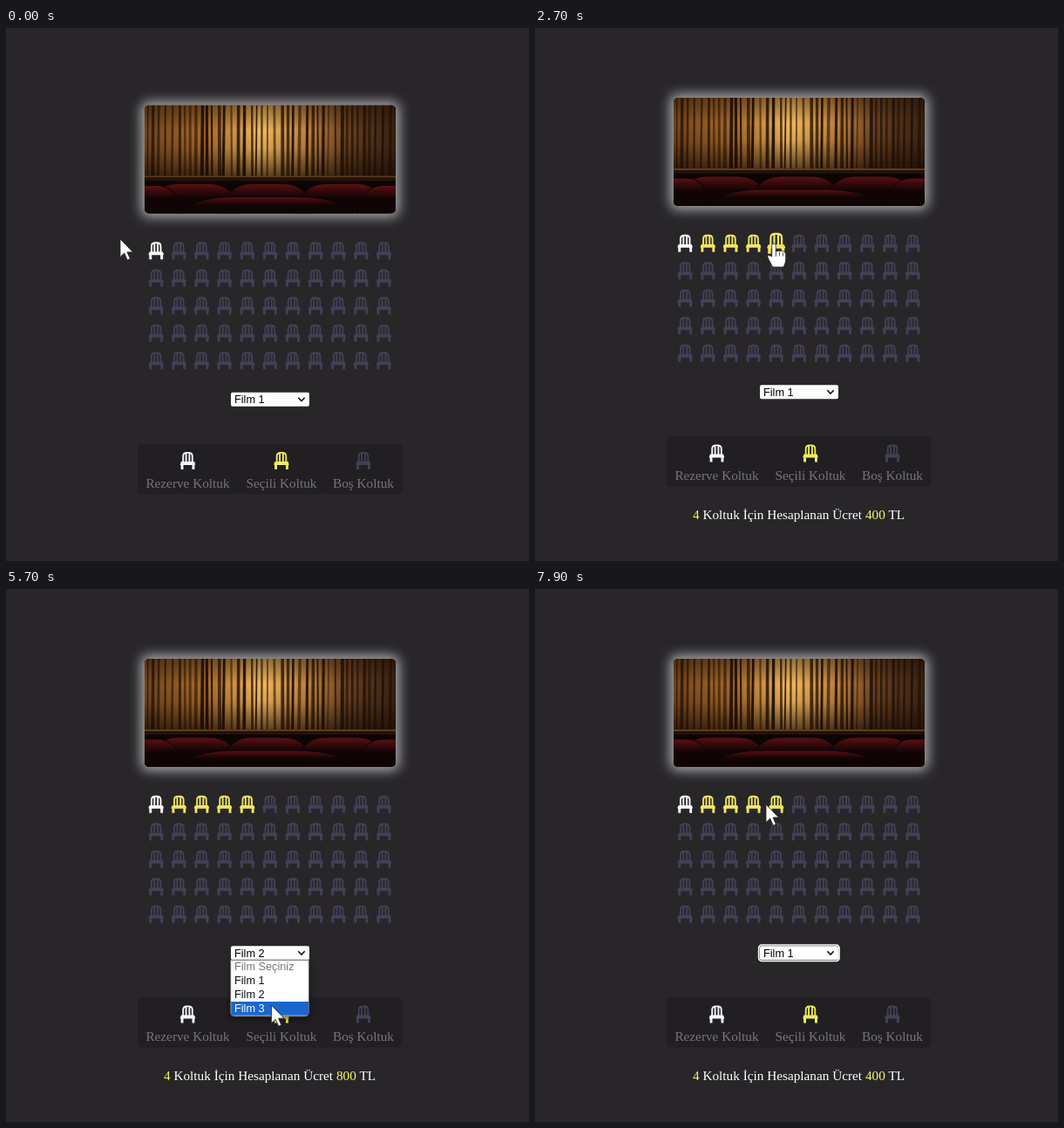
Recreate the animation shown at these times as an HTML page. Size 600x611 px, loop 8000 ms.

```html
<!DOCTYPE html>
<html lang="tr">
<head>
<meta charset="utf-8">
<style>
html, body { margin: 0; width: 100%; height: 100%; overflow: hidden; background: #282629; }
svg { display: block; width: 100vw; height: 100vh; }
.serif { font: 15.27px "Liberation Serif", "Times New Roman", serif; text-anchor: middle; }
.sans { font: 12.73px "Liberation Sans", Arial, sans-serif; }
</style>
</head>
<body>
<svg viewBox="0 0 600 611">
  <defs>
    <g id="chair">
      <path d="M-5.300 2V-5Q-5.300-9-1-9H1Q5.300-9 5.300-5V2M-1.900-9V2M1.900-9V2" fill="none" stroke="currentColor" stroke-width="1.870"/>
      <path d="M-7.500 1.200H7.500L8.700 4Q8.700 5 7.900 5V10H5V5H-5V10H-7.900V5Q-8.700 5-8.700 4z" fill="currentColor"/>
    </g>
    <linearGradient id="cloth">
      <stop offset="0" stop-color="#7a4a1c"/>
      <stop offset=".25" stop-color="#b0702e"/>
      <stop offset=".46" stop-color="#ffc465"/>
      <stop offset=".65" stop-color="#c88740"/>
      <stop offset=".82" stop-color="#6b4220"/>
      <stop offset="1" stop-color="#3a2314"/>
    </linearGradient>
    <linearGradient id="shade" x2="0" y2="1">
      <stop offset="0" stop-color="#170a03" stop-opacity=".45"/>
      <stop offset=".35" stop-color="#170a03" stop-opacity=".05"/>
      <stop offset=".6" stop-color="#170a03" stop-opacity=".15"/>
      <stop offset="1" stop-color="#170a03" stop-opacity=".7"/>
    </linearGradient>
    <linearGradient id="velvet" x2="0" y2="1">
      <stop offset="0" stop-color="#5c1214"/>
      <stop offset=".2" stop-color="#3a0a0c"/>
      <stop offset=".45" stop-color="#100405"/>
    </linearGradient>
    <clipPath id="frame"><rect width="288" height="124" rx="5"/></clipPath>
    <filter id="glow" x="-20%" y="-40%" width="140%" height="180%"><feGaussianBlur stdDeviation="7"/></filter>
    <filter id="soft" x="-20%" y="-20%" width="140%" height="150%"><feGaussianBlur stdDeviation="4"/></filter>
  </defs>

  <g id="page">
    <g transform="translate(159 80)">
      <rect x="-4" y="-4" width="296" height="132" rx="8" fill="#fff" opacity=".62" filter="url(#glow)"/>
      <g clip-path="url(#frame)">
        <rect width="288" height="124" fill="#0c0505"/>
        <rect width="288" height="82" fill="url(#cloth)"/>
        <g id="folds" fill="#1f0f05"/>
        <rect width="288" height="82" fill="url(#shade)"/>
        <rect y="81" width="288" height="2" fill="#5d3b1b"/>
        <rect y="83" width="288" height="4" fill="#22120a"/>
        <g id="stalls" fill="url(#velvet)" stroke="#080304"/>
      </g>
    </g>
    <g id="seats"></g>
    <rect x="151" y="468.300" width="303.500" height="57.500" rx="5" fill="#211f22"/>
    <g class="serif" fill="#777577">
      <text x="208.500" y="518">Rezerve Koltuk</text>
      <text x="316" y="518">Seçili Koltuk</text>
      <text x="410" y="518">Boş Koltuk</text>
    </g>
    <use href="#chair" x="208.500" y="487.400" color="#f7f7f9"/>
    <use href="#chair" x="316" y="487.400" color="#f1eb5b"/>
    <use href="#chair" x="410" y="487.400" color="#434056"/>
    <rect id="ring" x="256.700" y="408" width="92.300" height="18.500" rx="3.500" fill="#111" stroke="#fff" stroke-width="1.700"/>
    <rect x="258" y="409.300" width="90" height="16" rx="2" fill="#fff"/>
    <text class="sans" id="choice" x="262" y="421.700"></text>
    <path d="M335.300 415.300l3.700 3.700 3.700-3.700" fill="none" stroke="#111" stroke-width="1.600"/>
    <g id="menu" class="sans">
      <rect x="258" y="430" width="90" height="62" rx="5" opacity=".55" filter="url(#soft)"/>
      <path d="M257.700 425.300h89.800v59.500q0 5-5 5h-79.800q-5 0-5-5z" fill="#fff" stroke="#66656a" stroke-width=".9"/>
      <rect id="mark" x="258.200" width="88.800" height="15.800" fill="#1a66cf"/>
    </g>
  </g>
  <text class="serif" id="total" x="302.500" y="563" fill="#fff"><tspan id="count" fill="#f8f562"></tspan> Koltuk İçin Hesaplanan Ücret <tspan id="price" fill="#f8f562"></tspan> TL</text>
  <g id="cursor" fill="#fff" stroke="#222" stroke-width=".8">
    <path id="arrow" d="M0 0v20.500l4.800-4.500 3.400 8 3.200-1.400-3.400-7.700h6.500z"/>
    <g id="hand">
      <path d="M-2 2Q0-2 2.500 2V9Q13 7 14 12V18Q14 22 11.500 27H-1L-6 17.500Q-9 11-2 15z"/>
      <path d="M2.700 9v6M6.800 9.500v5M10.700 10.500v4" fill="none"/>
    </g>
  </g>
</svg>
<script>
const LOOP = 8000, FADE = 300, SAMPLES = 8, SAMPLE_MS = 25;
const $ = id => document.getElementById(id);
const show = (id, on) => $(id).style.display = on ? '' : 'none';
const clamp = (v, lo, hi) => Math.min(hi, Math.max(lo, v));
function add(parent, tag, attrs) {
  const el = document.createElementNS('http://www.w3.org/2000/svg', tag);
  for (const k in attrs) el.setAttribute(k, attrs[k]);
  return $(parent).appendChild(el);
}

// Curtain folds
let seed = 11;
const rnd = () => (seed = seed * 16807 % 2147483647) / 2147483647;
for (let x = 3; x < 288; x += 5 + rnd() * 4) {
  const w = 1.5 + rnd() * 2, lean = rnd() * 2 - 1;
  add('folds', 'path', {
    d: `M${x} 0h${w}L${x + w + lean} 82h${-w * 1.2}z`,
    opacity: .55 + rnd() * .4
  });
}

// Cinema chairs: back row, two at the sides, one in front
function stall(left, width, top) {
  const right = left + width, bend = width / 6;
  add('stalls', 'path', {
    d: `M${left} 126Q${left + bend / 2} ${top} ${left + bend * 2} ${top}H${right - bend * 2}Q${right - bend / 2} ${top} ${right} 126z`
  });
}
for (let i = 0; i < 3; i++) stall(i * 85, 112, 90);
stall(-45, 90, 92);
stall(243, 90, 92);
stall(36, 206, 105);

const EMPTY = [67, 64, 86], PICKED = [241, 231, 98];
const seats = Array.from({ length: 55 }, (_, i) => ({
  x: 172.2 + i % 11 * 26.13,
  y: 246.7 + Math.floor(i / 11) * 31.5,
  el: add('seats', 'use', { href: '#chair' })
}));

const rowY = i => 425.3 + i * 15.9;
const films = ['Film Seçiniz', 'Film 1', 'Film 2', 'Film 3'];
const rows = films.map((name, i) => {
  const el = add('menu', 'text', { x: 262, y: rowY(i) + 12 });
  el.textContent = name;
  return el;
});

const clicks = [600, 1000, 1340, 2100];
const menus = [
  { open: 3900, pick: 4450, film: 2 },
  { open: 5200, pick: 5750, film: 3 },
  { open: 6250, pick: 6900, film: 1 }
];

// The cursor visits every seat it clicks, then the menu and its rows
const stops = [
  [0, 131, 242],
  ...clicks.map((t, i) => [t, seats[i + 1].x - i, 247]),
  ...menus.flatMap(({ open, pick, film }, i) => [
    [open - 250, 327 + i * 9, 415],
    [pick - 100, 302, rowY(film) + 8]
  ]),
  [7550, 265, 247],
  [LOOP, 265, 247]
];

// Rest at a stop, then move; longer ways take longer
function cursorAt(t) {
  t = Math.max(0, t);
  const i = Math.max(1, stops.findIndex(s => s[0] >= t));
  const [t0, x0, y0] = stops[i - 1], [t1, x1, y1] = stops[i];
  const span = Math.min(t1 - t0, 290 + 1.2 * Math.hypot(x1 - x0, y1 - y0));
  const u = clamp(1 - (t1 - t) / span, 0, 1), e = u * u * (3 - 2 * u);
  return [x0 + (x1 - x0) * e, y0 + (y1 - y0) * e];
}

function draw(t) {
  const count = clicks.filter(c => t >= c).length;
  const shift = count ? 0 : 8.5;
  const opened = menus.some(m => t >= m.open && t < m.pick);
  const picked = menus.filter(m => t >= m.pick).pop();
  const film = picked ? picked.film : 1;
  const [cx, cy] = cursorAt(t);
  const trail = Array.from({ length: SAMPLES }, (_, k) => cursorAt(t - k * SAMPLE_MS));
  let pointing = false;

  $('page').setAttribute('transform', `translate(0 ${shift})`);
  seats.forEach(({ x, y, el }, i) => {
    const over = ([px, py]) => i > 0 && Math.abs(px - x) < 8.7 && Math.abs(py - y - shift) < 11;
    pointing ||= over([cx, cy]);
    const scale = 1 + .2 * trail.filter(over).length / SAMPLES;
    const k = i && i <= count ? clamp((t - clicks[i - 1]) / FADE, 0, 1) : 0;
    el.setAttribute('transform', `translate(${x} ${y}) scale(${scale})`);
    el.setAttribute('color', i ? `rgb(${EMPTY.map((v, j) => v + (PICKED[j] - v) * k)})` : '#fff');
  });

  show('menu', opened);
  show('ring', picked && !opened);
  $('choice').textContent = films[film];
  const lit = cy < rowY(0) ? film : clamp(Math.floor((cy - rowY(0)) / 15.9), 1, 3);
  $('mark').setAttribute('y', rowY(lit));
  rows.forEach((el, i) => el.setAttribute('fill', i === lit ? '#fff' : i ? '#111' : '#777'));

  show('total', count);
  $('count').textContent = count;
  $('price').textContent = count * film * 100;

  $('cursor').setAttribute('transform', `translate(${cx} ${cy})`);
  show('hand', pointing);
  show('arrow', !pointing);
}

function tick() {
  draw(performance.now() % LOOP);
  requestAnimationFrame(tick);
}
tick();
</script>
</body>
</html>
```
